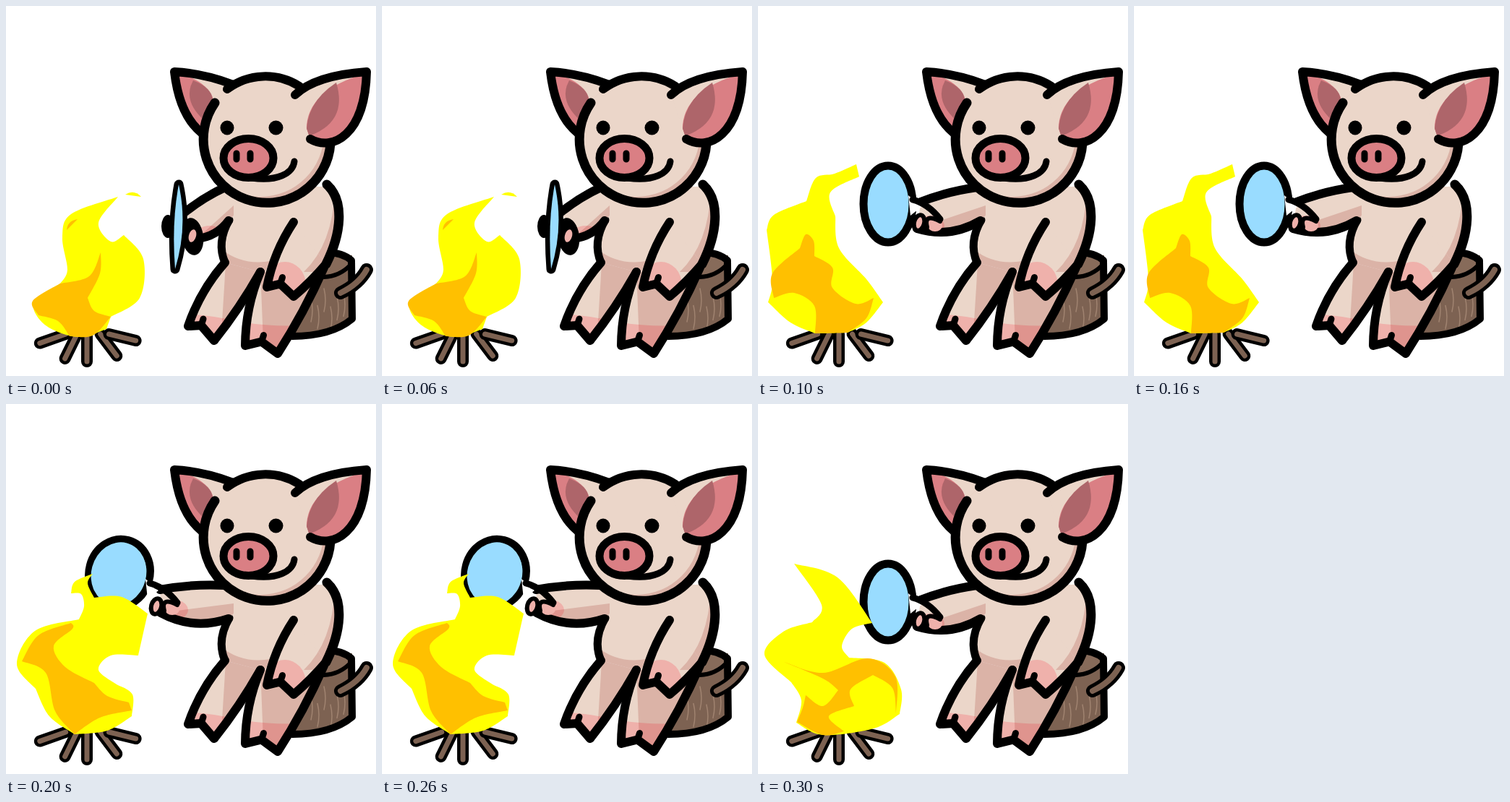
An HTML page that plays this animation: 512x512 px, repeating every 0.4 s.

```html
<!DOCTYPE html>
<html lang="en">
<head>
<meta charset="utf-8">
<title>Pig fanning a campfire</title>
<style>
  html, body { margin: 0; width: 100%; height: 100%; overflow: hidden; background: #fff; }
  svg { display: block; width: 100vw; height: 100vh; stroke-linecap: round; stroke-linejoin: round; }
  .shadow { fill: rgb(238 214 212); mix-blend-mode: multiply; }
  .step { visibility: hidden; animation: show 400ms step-end infinite; animation-delay: calc((var(--i) - 4) * 100ms); }
  .twice { animation-name: alternate; animation-delay: 0s; }
  @keyframes show { 0% { visibility: visible; } 25%, 100% { visibility: hidden; } }
  @keyframes alternate { 0%, 50%, 100% { visibility: hidden; } 25%, 75% { visibility: visible; } }
</style>
</head>
<body>
<svg id="stage" viewBox="0 0 512 512"></svg>
<script>
const skin = '#ebd6c9', pink = '#da7f84', darkPink = '#ae656a', blush = '#efb1ab';
const wood = '#7d6252', woodTop = '#876b5a', grain = '#a08370';
const blue = '#99dcff', yellow = '#ffff00', orange = '#ffc000';
const weight = 13;

const fill = (color, d) => `<path d="${d}" fill="${color}"/>`;
const shadow = d => `<path d="${d}" class="shadow"/>`;
const line = (width, d, color = '#000') =>
  `<path d="${d}" fill="none" stroke="${color}" stroke-width="${width}"/>`;
const oval = (x, y, rx, ry, color, width = 0, turn = 0) =>
  `<ellipse cx="${x}" cy="${y}" rx="${rx}" ry="${ry}" fill="${color}" stroke="#000" stroke-width="${width}" transform="rotate(${turn} ${x} ${y})"/>`;
const step = (i, content) => `<g class="step" style="--i:${i}">${content}</g>`;

let clips = 0;
function inside(d, content) {
  const id = 'clip' + clips++;
  return `<clipPath id="${id}"><path d="${d}"/></clipPath><g clip-path="url(#${id})">${content}</g>`;
}

// Curve from a to b, bent sideways by a share of its length.
function bend(a, b, share) {
  const [dx, dy] = [b[0] - a[0], b[1] - a[1]];
  return `Q${a[0] + dx / 2 + share * dy} ${a[1] + dy / 2 - share * dx} ${b}`;
}

// Smooth curve through a few points; "/" marks a sharp corner.
function spline(text) {
  let last, d = '';
  for (const run of text.split('/')) {
    const pts = run.trim().split(/\s+/).map(p => p.split(',').map(Number));
    if (last) pts.unshift(last);
    else d = 'M' + pts[0];
    last = pts.at(-1);
    pts.slice(0, -1).forEach((a, i) => {
      const b = pts[i + 1], before = pts[i - 1] || a, after = pts[i + 2] || b;
      const c1 = a.map((v, k) => v + (b[k] - before[k]) / 6);
      const c2 = b.map((v, k) => v - (after[k] - a[k]) / 6);
      d += `C${c1} ${c2} ${b}`;
    });
  }
  return d + 'Z';
}

// Leg or arm ending in a cloven hoof between heel and toe.
function limb(start, heel, toe, end, details) {
  const notch = [(heel[0] + toe[0]) / 2, (heel[1] + toe[1]) / 2 - 11];
  const d = `M${start}${bend(start, heel, -0.1)}L${notch}L${toe}${bend(toe, end, -0.04)}`;
  return inside(d + 'Z', fill(skin, d) + details) + line(weight - 1, d) +
    line(9, `M${notch}l3 -9`);
}

function makeLog() {
  let marks = '';
  for (let i = 0; i < 6; i++) {
    const x = 422 + i * 9, y = 405 + 14 * Math.sin(i * 2.4);
    marks += line(1.5, `M${x} ${y}q4 16 0 32`, grain);
  }
  const branch = 'M463 397Q488 385 499 365';
  return fill(wood, 'M400 345H479V434Q450 458 395 457Z') + oval(442, 358, 37, 16, woodTop) + marks +
    line(10, 'M444 341Q465 341 478 352L479 433Q450 457 396 457') +
    line(6, 'M477 358Q462 374 440 375') + line(18, branch) + line(8, branch, wood);
}

function makeBody() {
  const torso = 'M300 250H444C470 270 466 310 443 357L352 372 303 355Q294 325 309 295Z';
  const side = 'M455 255Q452 330 412 368H470V255Z';
  return inside(torso, fill(skin, torso) + shadow(side) + shadow('M295 334Q325 360 366 353L352 380H295Z')) +
    limb([303, 355], [252, 443], [288, 463], [352, 368],
      fill(blush, 'M240 426Q275 426 320 436V480H240Z') + shadow('M305 340L297 470H400V340Z')) +
    limb([352, 368], [331, 470], [376, 481], [440, 362],
      fill(blush, 'M320 436Q360 444 410 442V490H320Z') + shadow('M352 365L357 490H460V365Z')) +
    limb([398, 299], [361, 389], [398, 402], [443, 357],
      oval(386, 386, 29, 32, blush) + shadow(side)) +
    line(weight, 'M444 247C469 270 464 315 443 357') +
    line(11, 'M309 296Q291 327 303 355');
}

function makeHead() {
  const round = 'M273 184a88 88 0 0 1 176 0a88 88 0 0 1 -176 0Z';
  const leftEar = 'M312 108Q272 93 233 91Q240 151 271 176';
  const rightEar = 'M400 123Q428 96 499 91C497 178 452 202 421 184';
  return inside(leftEar, fill(skin, leftEar) +
      fill(pink, 'M230 90Q280 103 287 130L272 185 230 150Z') +
      fill(darkPink, 'M259 103Q285 113 286 130L273 157Q244 130 259 103Z')) +
    line(weight - 1, leftEar) +
    inside(round, fill(skin, round) + shadow(round + 'M264 176a88 88 0 0 0 176 0a88 88 0 0 0 -176 0Z')) +
    line(weight - 1, 'M306 115A88 88 0 0 1 406 111') +
    line(weight, 'M289 134A88 88 0 1 0 449 190') +
    inside(rightEar, fill(skin, rightEar) +
      fill(pink, 'M499 93Q402 120 418 190L470 200 510 150Z') +
      fill(darkPink, 'M457 106Q474 162 416 181Q413 135 457 106Z')) +
    line(weight - 1, rightEar) +
    oval(306, 168.5, 9.5, 10, '#000') + oval(373.5, 168.5, 10, 10, '#000') +
    line(9, 'M340 238C375 243 397 232 399 215') +
    fill('#000', 'M305 228Q345 258 371 224Z') +
    oval(335.5, 210.5, 34.5, 27, pink, 11) +
    line(9, 'M319 204v8M338 204v8');
}

function arm(top, bottom) {
  const shoulder = [303, 251], elbow = [308, 297];
  const upper = bend(shoulder, top, -0.06), lower = bend(bottom, elbow, -0.22);
  const d = `M${shoulder}${upper}L${bottom}${lower}L330 275Z`;
  return inside(d, fill(skin, d) + oval(bottom[0] + 18, bottom[1] - 4, 20, 14, blush) +
      shadow(`M${bottom}L315 276V340H${bottom[0]}Z`)) +
    line(weight - 1, `M${shoulder}${upper}`) + line(weight - 1, `M${bottom}${lower}`);
}

const grip = fill('#fff', 'M208 262L226 278 211 290Z') +
  line(9, 'M214 268Q236 274 252 295') +
  oval(245, 304, 10, 8, blush) + line(6, 'M234 306Q229 286 252 298') +
  oval(223, 300, 7, 11, blush, 6, 15);

const edgePose = arm([248, 285], [264, 322]) +
  oval(224, 305, 9, 16, '#000') + oval(258, 319, 15, 26, '#000', 0, -8) +
  oval(258, 318, 5, 9, blush, 0, 15) +
  `<path d="M239 247Q252 305 234 364Q229 300 239 247Z" fill="${blue}" stroke="#000" stroke-width="13" paint-order="stroke"/>`;
const sidePose = arm([225, 271], [220, 308]) + oval(180, 274, 34, 53, blue, 11) + grip;
const raisedPose = arm([213, 257], [214, 289]) + oval(157, 234, 42, 47, '#fff', 11, 15) +
  oval(156, 235, 38, 44, blue, 0, 15) + `<g transform="translate(-15 -20)">${grip}</g>`;

function makeSticks() {
  return [155, 115, 90, 55, 20].map(degrees => {
    const angle = degrees * Math.PI / 180;
    const dx = 72 * Math.cos(angle), dy = 44 * Math.sin(angle);
    const stick = `M${112 + dx * 0.45} 454L${112 + dx} ${448 + dy}`;
    return line(16, stick) + line(7, stick, wood);
  }).join('');
}

const flames = [
  {
    outer: '155,264 90,288 78,320 85,365 75,384 / 38,410 55,442 100,458 139,447 / 145,430 / 185,404 190,350 163,317 / 145,326 128,300 155,264',
    inner: '75,384 115,374 131,341 / 130,370 113,404 / 122,422 145,430 / 120,456 88,457 / 72,436 45,428 / 37,408 75,384',
    extra: fill(yellow, 'M165 261Q177 253 187 264Z') + fill(orange, 'M84 310Q85 297 99 295Z')
  },
  {
    outer: '136,219 / 140,236 / 100,258 107,291 / 112,335 150,378 173,410 / 150,438 124,452 / 79,453 / 45,438 14,410 / 20,379 12,310 / 22,289 67,270 / 80,238 106,232 136,219',
    inner: '22,404 / 20,370 58,335 / 66,316 77,325 78,346 / 103,362 103,390 135,412 160,404 / 150,432 124,452 / 79,453 / 78,415 50,397 22,404'
  },
  {
    outer: '120,235 / 113,248 122,268 / 160,267 196,290 / 183,348 / 145,348 128,368 153,388 / 175,402 174,432 / 140,452 95,457 / 60,432 41,394 / 15,360 40,314 101,298 / 108,280 104,263 90,262 / 95,246 120,235',
    inner: '22,356 45,320 90,303 / 92,311 66,335 82,364 122,386 / 140,404 170,413 / 174,424 / 130,434 95,457 / 68,425 55,372 22,356'
  },
  {
    outer: '50,221 110,240 158,303 / 130,311 116,335 126,351 / 175,358 198,395 196,429 / 160,449 90,458 53,441 / 60,410 46,385 / 9,347 35,315 75,302 / 88,278 50,221',
    inner: '36,357 90,372 152,352 190,377 191,428 / 186,393 159,375 / 128,395 133,418 / 98,432 119,453 / 90,458 54,440 / 62,420 66,403 / 90,418 111,396 / 90,380 36,357'
  }
];
const makeFlame = ({ outer, inner, extra = '' }) =>
  fill(yellow, spline(outer)) + fill(orange, spline(inner)) + extra;

document.getElementById('stage').innerHTML =
  makeLog() + makeBody() +
  step(0, edgePose) + `<g class="step twice">${sidePose}</g>` + step(2, raisedPose) +
  makeHead() + makeSticks() + flames.map((flame, i) => step(i, makeFlame(flame))).join('');
</script>
</body>
</html>
```
